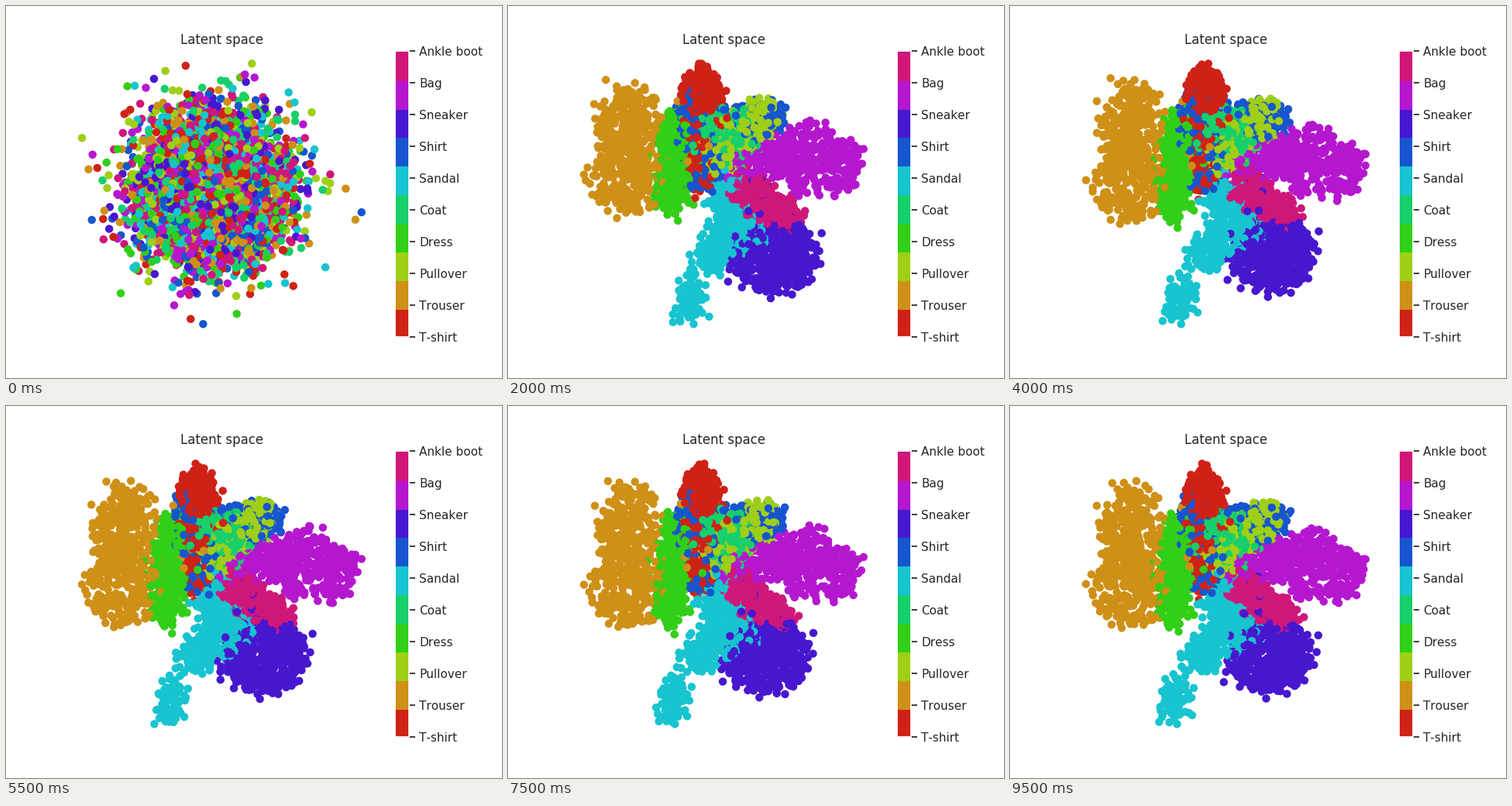
A matplotlib script that plays this animation: 640 by 480 pixels, repeating every 10 s.

```python
import colorsys

import numpy as np
import matplotlib.pyplot as plt
from matplotlib.animation import FuncAnimation
from matplotlib.colors import ListedColormap

FRAMES, INTERVAL = 20, 500
COUNT = 5000
INK = "#262626"
PALETTE = [colorsys.hls_to_rgb(0.1 * i + 0.01, 0.45, 0.8) for i in range(10)]
# Extent of the point cloud in stage pixels, y pointing down
LOW, HIGH = np.array([98.04, 74.4]), np.array([458.76, 410.4])
MIDDLE = np.array([285, 175])

# Settled clusters as ellipses: centre x, y, half axes, tilt in degrees
CLUSTERS = {
    "T-shirt": [(246, 103, 22, 26, 0), (243, 165, 13, 68, 3)],
    "Trouser": [(156, 150, 38, 58, 5), (156, 222, 46, 58, 0)],
    "Pullover": [(292, 165, 60, 22, -40)],
    "Dress": [(212, 202, 19, 72, 5)],
    "Coat": [(277, 163, 32, 30, 0)],
    "Sandal": [(270, 248, 28, 26, 0), (270, 295, 52, 24, -28),
               (209, 368, 15, 30, 8)],
    "Shirt": [(244, 168, 26, 64, -10), (308, 140, 46, 22, 0)],
    "Sneaker": [(328, 311, 52, 46, -20)],
    "Bag": [(320, 194, 50, 22, -10), (385, 198, 60, 40, 15)],
    "Ankle boot": [(318, 245, 46, 17, 32)],
}
NAMES = list(CLUSTERS)

rng = np.random.default_rng(7)
labels = rng.permutation(np.arange(COUNT) % 10)


def is_in(*names):
    return np.isin(labels, [NAMES.index(name) for name in names])


def fill(ellipses, n):
    """Scatter n points over ellipses, each with a share by its area."""
    shapes = np.array(ellipses, float)
    area = shapes[:, 2] * shapes[:, 3]
    x, y, a, b, tilt = shapes[rng.choice(len(shapes), n, p=area / area.sum())].T
    r, turn = rng.random(n) ** 0.55, rng.uniform(0, 2 * np.pi, n)
    u, v = a * r * np.cos(turn), b * r * np.sin(turn)
    c, s = np.cos(np.radians(tilt)), np.sin(np.radians(tilt))
    return np.column_stack([x + u * c - v * s, y + u * s + v * c])


def fit(xy):
    """Stretch the cloud to the limits, as autoscaled axes do."""
    low, high = xy.min(axis=0), xy.max(axis=0)
    return LOW + (xy - low) / (high - low) * (HIGH - LOW)


untrained = rng.normal(size=(COUNT, 2))
settled = np.zeros((COUNT, 2))
for k, ellipses in enumerate(CLUSTERS.values()):
    members = labels == k
    settled[members] = fill(ellipses, members.sum())

# A few points stray from their cluster towards the middle
stray = (rng.random(COUNT) < 0.05) * rng.uniform(0, 0.7, COUNT)
settled += stray[:, None] * (MIDDLE - settled)
fuzz = rng.normal(size=(COUNT, 2))

# Early in training: long garments are squat, shoes sit right, bags sit high
early = np.zeros((COUNT, 2))
x, y = settled.T
long_wear, bags = is_in("Trouser", "Dress"), is_in("Bag")
shoes = is_in("Sandal", "Sneaker", "Ankle boot")
early[long_wear, 1] = -8 - 0.2 * (y[long_wear] - 180)
early[bags, 1] = -0.12 * (x[bags] - 310)
early[shoes, 0] = 16 + 0.4 * np.maximum(0, 270 - x[shoes])
early[shoes, 1] = 10


def positions(frame):
    if frame == 0:
        return fit(untrained)
    youth = np.exp((2 - frame) / 3)
    shimmer = np.random.default_rng(frame).normal(0, 1.5, settled.shape)
    return fit(settled + youth * early + (5 + 2 * youth) * fuzz + shimmer)


plt.rcParams.update({"font.family": "DejaVu Sans", "text.kerning_factor": 6})
fig, ax = plt.subplots(figsize=(6.4, 4.8), dpi=100)
points = ax.scatter(*positions(0).T, c=labels, cmap=ListedColormap(PALETTE),
                    vmin=0, vmax=9, s=36, linewidths=1.5)
bar = fig.colorbar(points, ax=ax, ticks=range(10))
bar.solids.set_edgecolor("face")
bar.ax.set_yticklabels(NAMES)
bar.ax.tick_params(length=6, width=1.25, pad=3.5, labelsize=11,
                   color=INK, labelcolor=INK)
bar.outline.set(edgecolor="white", linewidth=1.25)
ax.set(xlim=(80, 476.8), ylim=(427.2, 57.6))
ax.set_title("Latent space", fontsize=12, color=INK)
ax.axis("off")


def draw(frame):
    points.set_offsets(positions(frame))
    return points,


animation = FuncAnimation(fig, draw, frames=FRAMES, interval=INTERVAL,
                          repeat=True, repeat_delay=0)
plt.show()
```
